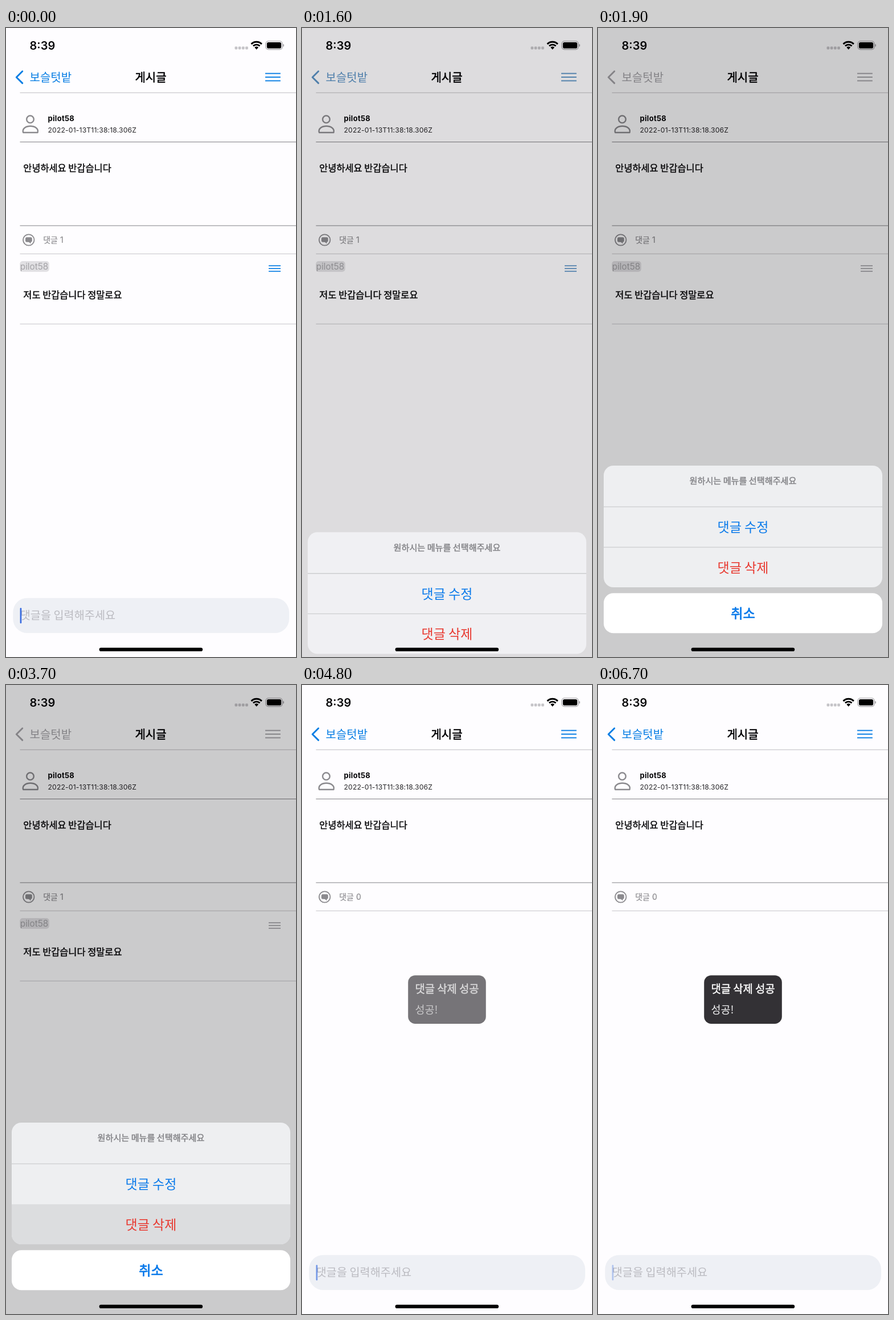
Write an HTML page with a canvas that moves like this. It is 509 px wide and 1101 px high and loops after 6800 ms.

```html
<!DOCTYPE html>
<html lang="ko">
<head>
<meta charset="utf-8">
<title>게시글</title>
<style>
html, body { margin: 0; width: 100%; height: 100%; overflow: hidden; background: #fefdff; }
canvas { display: block; width: 509px; height: 1101px; }
</style>
</head>
<body>
<canvas id="stage" width="509" height="1101"></canvas>
<script>
const ctx = document.getElementById('stage').getContext('2d');
const W = 509, H = 1101, LOOP = 6800, STEP = 100;
const KR = '"Noto Sans CJK KR", "Noto Sans CJK", sans-serif';
const LATIN = 'Inter, sans-serif';
const USER = 'pilot58';
const INK = '#050507', GREY = '#8b8a8e';
const SHEET_TOP = 766;

// Caret opacity over the loop: [ms, alpha]
const CARET = [
  [0, 1], [100, 1], [300, 0], [400, 0], [700, 1], [1100, 1], [1300, 0], [1400, 0],
  [1600, 1], [4300, 1], [4500, 0], [4600, 0], [4900, 1], [5200, 1], [5500, 0],
  [5600, 0], [5800, 1], [6200, 1], [6500, 0], [6600, 0], [6900, 1]
];

const clamp = v => Math.max(0, Math.min(1, v));

function track(keys, t) {
  const i = keys.findIndex(k => k[0] > t);
  const [t0, a] = keys[i - 1], [t1, b] = keys[i];
  return a + (b - a) * (t - t0) / (t1 - t0);
}

// Critically damped spring, 0 to 1
function spring(ms) {
  if (ms <= 0) return 0;
  const x = ms * 0.01826;
  return 1 - (1 + x) * Math.exp(-x);
}

function sheetProgress(t) {
  if (t < 1900) return spring(t - 1478);
  return t < 4300 ? 1 - spring(t - 3753) : 0;
}

function mix(a, b, k) {
  return `rgb(${a.map((v, i) => Math.round(v + (b[i] - v) * k)).join()})`;
}

// y is the middle of the letters; heft thickens strokes for a medium weight
function text(str, x, y, size, color, { weight = 400, family = KR, align = 'left', spacing = 0, heft = 0 } = {}) {
  const baseline = y + size * (family === KR ? 0.376 : 0.364);
  ctx.font = `${weight} ${size}px ${family}`;
  ctx.textAlign = align;
  ctx.letterSpacing = spacing + 'px';
  ctx.fillStyle = ctx.strokeStyle = color;
  ctx.fillText(str, x, baseline);
  if (heft) {
    ctx.lineWidth = heft;
    ctx.strokeText(str, x, baseline);
  }
}

function box(x, y, w, h, r, color) {
  ctx.fillStyle = color;
  ctx.beginPath();
  ctx.roundRect(x, y, w, h, r);
  ctx.fill();
}

function stroke(points, color, width) {
  ctx.strokeStyle = color;
  ctx.lineWidth = width;
  ctx.beginPath();
  points.forEach(([x, y]) => ctx.lineTo(x, y));
  ctx.stroke();
}

function ring(x, y, r, color, width) {
  ctx.strokeStyle = color;
  ctx.lineWidth = width;
  ctx.beginPath();
  ctx.arc(x, y, r, 0, Math.PI * 2);
  ctx.stroke();
}

const rule = (y, color) => stroke([[24.5, y], [W, y]], color, 1.2);

function burger(x, y, w, gap, color, width) {
  for (let i = -1; i <= 1; i++) stroke([[x, y + i * gap], [x + w, y + i * gap]], color, width);
}

function statusBar() {
  text('8:39', 41.5, 30.5, 20, INK, { weight: 600, family: LATIN });
  for (let i = 0; i < 4; i++) box(401.5 + i * 6.2, 32.5, 4.8, 5, 1.4, '#c5c4c8');

  ctx.strokeStyle = ctx.fillStyle = '#000';
  ctx.lineWidth = 2.9;
  for (const r of [13, 8.2]) {
    ctx.beginPath();
    ctx.arc(439.7, 37.3, r, -Math.PI * 0.75, -Math.PI * 0.25);
    ctx.stroke();
  }
  ctx.beginPath();
  ctx.moveTo(439.7, 37.8);
  ctx.arc(439.7, 37.3, 4.8, -Math.PI * 0.75, -Math.PI * 0.25);
  ctx.fill();

  ctx.strokeStyle = '#9d9ca0';
  ctx.lineWidth = 1.2;
  ctx.beginPath();
  ctx.roundRect(456, 23, 29, 14.6, 4.5);
  ctx.stroke();
  box(457.9, 24.9, 25.2, 10.8, 2.8, '#000');
  box(486.3, 28, 1.7, 4.8, [0, 2, 2, 0], '#9d9ca0');
}

function navBar(tint) {
  ctx.lineCap = ctx.lineJoin = 'round';
  stroke([[28.8, 75.8], [18.3, 86.2], [28.8, 96.6]], tint, 2.9);
  ctx.lineCap = 'butt';
  text('보슬텃밭', 41.5, 86, 20, tint);
  text('게시글', 254, 86, 20, INK, { heft: 0.6, align: 'center' });
  burger(455, 86, 26.8, 6.4, tint, 1.9);
  rule(113.4, '#cbcacd');
}

function post(count) {
  ring(42.5, 159.8, 6.3, GREY, 2.4);
  ctx.beginPath();
  ctx.moveTo(30.2, 183);
  ctx.lineTo(55.6, 183);
  ctx.bezierCurveTo(57.6, 176, 50.5, 171.8, 42.8, 171.8);
  ctx.bezierCurveTo(35, 171.8, 28, 176, 30.2, 183);
  ctx.closePath();
  ctx.stroke();

  text(USER, 73.5, 158.5, 13, INK, { weight: 700, family: LATIN, spacing: 0.3 });
  text('2022-01-13T11:38:18.306Z', 73.5, 178.3, 12.2, '#262528', { family: LATIN, spacing: 0.15 });
  rule(199.5, '#828185');
  text('안녕하세요 반갑습니다', 30.3, 245, 16.4, INK, { heft: 0.4 });
  rule(346, '#828185');

  ring(39.8, 371, 9.7, GREY, 1.8);
  box(34, 366.2, 11.8, 8.6, 2.4, GREY);
  ctx.beginPath();
  ctx.moveTo(39.2, 374);
  ctx.lineTo(43.6, 374);
  ctx.lineTo(43.4, 377.4);
  ctx.fill();
  text('댓글 ' + count, 65.2, 371, 14, GREY, { family: 'Inter, ' + KR, heft: 0.2 });
  rule(395.3, '#d0cfd3');
}

function comment(tint) {
  box(24.3, 408, 51.5, 18.8, 5, '#e1e0e3');
  text(USER, 24.8, 417.8, 15.3, '#a3a2a6', { family: LATIN });
  burger(461, 421, 21, 4.8, tint, 1.7);
  text('저도 반갑습니다 정말로요', 30.3, 467, 16.4, INK, { heft: 0.4 });
  rule(518.2, '#d0cfd3');
}

function inputBar(caret) {
  box(12.3, 997.7, 484.7, 61.4, 25, '#eef0f5');
  text('댓글을 입력해주세요', 24.7, 1028, 19.7, '#bbbbc1');
  ctx.globalAlpha = caret;
  box(24.6, 1015, 2.7, 27.2, 1.3, '#3a6de0');
  ctx.globalAlpha = 1;
}

function toast(alpha) {
  if (!alpha) return;
  ctx.globalAlpha = alpha;
  box(186.2, 508.2, 136.6, 84.8, 12.5, '#333135');
  text('댓글 삭제 성공', 198.5, 531.7, 18.8, '#fff', { heft: 0.5 });
  text('성공!', 198.5, 568, 18.5, '#f4f4f5');
  ctx.globalAlpha = 1;
}

function actionSheet(p, pressed) {
  const center = { align: 'center' };
  const line = '#cdced0';
  ctx.save();
  ctx.translate(0, (1 - p) * (H - SHEET_TOP));
  box(10, SHEET_TOP, 489, 213, 17, mix([243, 243, 246], [238, 239, 241], p));
  if (pressed) box(10, 909, 489, 70, [0, 0, 17, 17], '#dcdddf');
  stroke([[10, 838.2], [499, 838.2]], line, 1.3);
  if (!pressed) stroke([[10, 908.9], [499, 908.9]], line, 1.3);
  text('원하시는 메뉴를 선택해주세요', 254.5, 792.8, 15.15, '#858589', { ...center, heft: 0.5 });
  text('댓글 수정', 254.5, 873.5, 23, '#0a7aea', center);
  text('댓글 삭제', 254.5, 944, 23, '#e8382f', center);
  box(10, 989.3, 489, 70, 17, '#fff');
  text('취소', 254.5, 1024, 23.2, '#0a7aea', { ...center, heft: 0.8 });
  ctx.restore();
}

function draw(t) {
  const p = sheetProgress(t);
  const tint = mix([8, 126, 228], [165, 164, 168], p ** 1.5);
  const deleted = t >= 4800;

  ctx.fillStyle = '#fefdff';
  ctx.fillRect(0, 0, W, H);
  statusBar();
  navBar(tint);
  post(deleted ? 0 : 1);
  if (!deleted) comment(tint);
  inputBar(track(CARET, t));
  toast(clamp((t - 4600) / 300));

  if (p > 0) {
    ctx.fillStyle = `rgba(0,0,0,${0.2 * p})`;
    ctx.fillRect(0, 0, W, H);
    actionSheet(p, t >= 3700 && t < 3900);
  }
  box(163.6, 1084.8, 181.6, 6.2, 3.1, '#000');
}

// The screen updates ten times a second
function frame() {
  const t = performance.now() % LOOP;
  draw(Math.floor(t / STEP) * STEP);
  requestAnimationFrame(frame);
}
frame();
</script>
</body>
</html>
```
